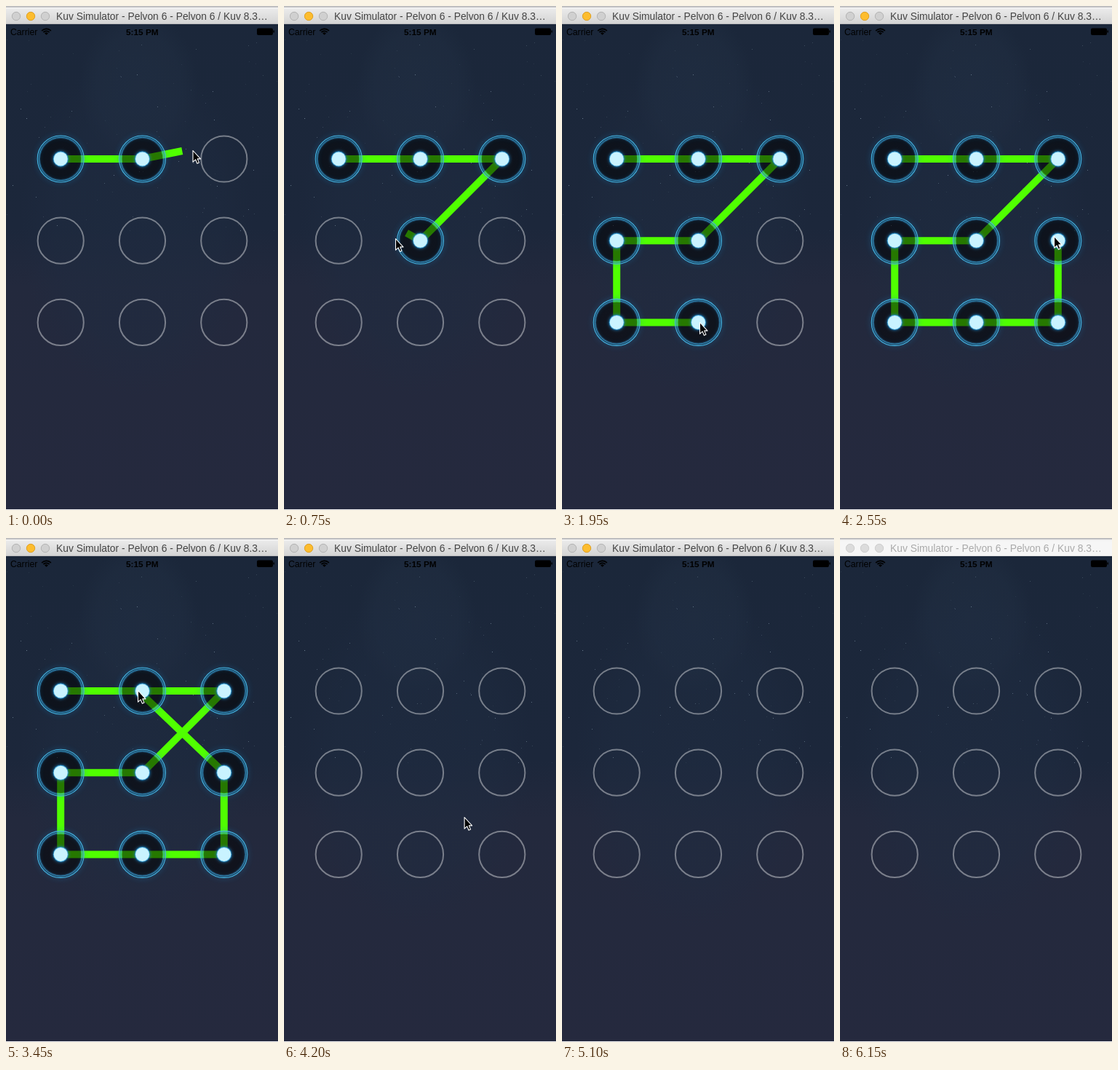
An HTML page with a canvas for the animation above (6210 ms loop, 374x692 px).

```html
<!DOCTYPE html>
<html lang="en">
<head>
<meta charset="utf-8">
<title>Pattern lock</title>
<style>
html, body { margin: 0; width: 100%; height: 100%; overflow: hidden; background: #222b3f; }
canvas { display: block; width: 374px; height: 692px; }
</style>
</head>
<body>
<canvas id="stage" width="374" height="692"></canvas>
<script>
const W = 374, H = 692, LOOP = 6210, STEP = 150, TAU = Math.PI * 2;
const RELEASE = 25, GONE = 34, INACTIVE = 41;
const TOUCH_LAG = .35, HIT_RADIUS = 31;
const SANS = '"Liberation Sans", Arial, sans-serif';
const canvas = document.getElementById('stage');
const ctx = canvas.getContext('2d');

const nodes = Array.from({ length: 9 }, (_, i) => [75.2 + (i % 3) * 112.3, 210 + Math.floor(i / 3) * 112.2]);

// Key points of the pointer: step, x, y.
const path = [
  [-1, 213, 198], [0, 256.5, 198], [1, 290, 207], [3, 236, 271], [5, 153, 319], [7, 108, 352],
  [8, 77, 330], [11, 74, 429], [12.6, 187, 434], [13, 189, 434], [14, 267, 435], [15, 297, 434],
  [16.6, 296, 317], [17, 294, 316], [21, 172, 318], [22.6, 181, 209], [RELEASE, 181, 209],
  [30, 292, 499], [31, 294, 554], [GONE, 322, 710]
];

function pointerAt(step) {
  const i = path.findIndex(key => key[0] > step);
  const [t0, x0, y0] = path[i - 1], [t1, x1, y1] = path[i];
  const k = (step - t0) / (t1 - t0);
  return [x0 + (x1 - x0) * k, y0 + (y1 - y0) * k];
}

// The line trails the pointer a little.
function touchAt(step) {
  const [x, y] = pointerAt(step - TOUCH_LAG);
  return [x + 1, y + 1];
}

// Nodes in the order the finger reaches them; the first two are already joined.
function joinedAt(step) {
  const joined = new Set([0, 1]);
  for (let s = 0; s <= step; s += .125) {
    const [x, y] = touchAt(s);
    nodes.forEach(([nx, ny], i) => {
      if (Math.hypot(x - nx, y - ny) < HIT_RADIUS) joined.add(i);
    });
  }
  return [...joined];
}

function circle(c, x, y, r) {
  c.beginPath();
  c.arc(x, y, r, 0, TAU);
}

function ring(x, y, r, width, color) {
  circle(ctx, x, y, r);
  ctx.lineWidth = width;
  ctx.strokeStyle = color;
  ctx.stroke();
}

function disc(x, y, r, color) {
  circle(ctx, x, y, r);
  ctx.fillStyle = color;
  ctx.fill();
}

function withGlow(color, blur, draw) {
  ctx.save();
  ctx.shadowColor = color;
  ctx.shadowBlur = blur;
  draw();
  ctx.restore();
}

function gradient(c, y0, y1, stops) {
  const g = c.createLinearGradient(0, y0, 0, y1);
  stops.forEach(([at, color]) => g.addColorStop(at, color));
  return g;
}

function haze(c, x, y, rx, ry, color) {
  c.save();
  c.translate(x, y);
  c.scale(rx, ry);
  const g = c.createRadialGradient(0, 0, 0, 0, 0, 1);
  g.addColorStop(0, `rgba(${color},.55)`);
  g.addColorStop(.7, `rgba(${color},.4)`);
  g.addColorStop(1, `rgba(${color},0)`);
  c.fillStyle = g;
  circle(c, 0, 0, 1);
  c.fill();
  c.restore();
}

function drawSky(c) {
  c.fillStyle = gradient(c, 25, H, [[0, '#1b273a'], [.42, '#1c273b'], [.54, '#23293d'], [1, '#25293e']]);
  c.fillRect(0, 0, W, H);
  haze(c, 182, 110, 82, 105, '34,48,68');
  haze(c, 180, 300, 160, 235, '31,44,65');

  let seed = 7;
  const random = () => (seed = seed * 16807 % 2147483647) / 2147483647;
  for (let i = 0; i < 90; i++) {
    c.fillStyle = `rgba(160,182,198,${.1 + .5 * random() ** 3})`;
    c.fillRect(Math.floor(random() * W), Math.floor(45 + random() * 265), 1, 1);
  }
  c.fillStyle = '#f4f4f6';
  c.fillRect(0, H - 1, W, 1);
}

function drawStatus(c) {
  c.fillStyle = c.strokeStyle = '#000';
  c.font = `12.2px ${SANS}`;
  c.fillText('Carrier', 6, 39.5);
  c.font = `bold 11.8px ${SANS}`;
  c.fillText('5:15 PM', 165, 39.5);

  const fan = r => c.arc(55.5, 39.7, r, -Math.PI * .77, -Math.PI * .23);
  c.lineWidth = 1.7;
  for (const r of [8.4, 5.4]) {
    c.beginPath();
    fan(r);
    c.stroke();
  }
  c.beginPath();
  c.moveTo(55.5, 39.7);
  fan(3.2);
  c.fill();

  c.beginPath();
  c.roundRect(345, 30.5, 22, 9.5, 2);
  c.fill();
  c.fillRect(367.5, 33.5, 1.5, 3);
}

function drawTitle(active) {
  ctx.fillStyle = active ? gradient(ctx, 3, 25, [[0, '#ebebeb'], [1, '#d3d3d3']]) : '#f6f6f6';
  ctx.fillRect(0, 0, W, 25);
  ctx.fillStyle = '#bfbfc1';
  ctx.fillRect(0, 0, W, 2);
  ctx.fillStyle = '#f0f0f0';
  ctx.fillRect(0, 2, W, 2);
  ctx.fillStyle = active ? '#b9b9bb' : '#dededf';
  ctx.fillRect(0, 24, W, 1);

  [14, 34, 54].forEach((x, i) => {
    const lit = active && i === 1;
    disc(x, 14, 5.7, lit ? '#fdbd2f' : active ? '#d0d0d0' : '#dcdcdc');
    ring(x, 14, 5.7, 1, lit ? '#dfa023' : active ? '#b4b4b4' : '#cecece');
  });
  ctx.fillStyle = active ? '#444' : '#aaa';
  ctx.font = `13.85px ${SANS}`;
  ctx.fillText('Kuv Simulator - Pelvon 6 - Pelvon 6 / Kuv 8.3…', 69, 19);
}

function drawIdleNode([x, y]) {
  ring(x, y, 31.6, 2, 'rgba(255,255,255,.4)');
}

function drawLitNode([x, y]) {
  disc(x, y, 28, 'rgba(0,0,0,.53)');
  ring(x, y, 30, 4, 'rgba(28,115,160,.3)');
  withGlow('#1c86c4', 7, () => ring(x, y, 32, 1.1, '#45b4e2'));
  ring(x, y, 29.7, 1, 'rgba(58,165,212,.75)');
  withGlow('#1b84c8', 4, () => disc(x, y, 10.4, '#3a9fd4'));
  disc(x, y, 9.5, '#c9f3ff');
}

function drawLine(points) {
  ctx.beginPath();
  points.forEach(p => ctx.lineTo(...p));
  ctx.strokeStyle = '#50ff00';
  ctx.lineWidth = 10;
  ctx.lineJoin = 'round';
  ctx.stroke();
}

const arrow = new Path2D('M.5 .5V16.2L4.1 12.8L6.4 18.2L9 17.1L6.7 11.9H11Z');

function drawPointer([x, y]) {
  ctx.save();
  ctx.translate(x, y);
  ctx.fillStyle = '#000';
  ctx.strokeStyle = '#fff';
  ctx.lineWidth = 1.1;
  ctx.fill(arrow);
  ctx.stroke(arrow);
  ctx.restore();
}

const backdrop = document.createElement('canvas');
backdrop.width = W;
backdrop.height = H;
drawSky(backdrop.getContext('2d'));
drawStatus(backdrop.getContext('2d'));

function render(step) {
  ctx.drawImage(backdrop, 0, 0);
  drawTitle(step < INACTIVE);

  const joined = step < RELEASE ? joinedAt(step) : [];
  if (joined.length) drawLine([...joined.map(i => nodes[i]), touchAt(step)]);
  nodes.forEach((node, i) => (joined.includes(i) ? drawLitNode : drawIdleNode)(node));
  if (step < GONE) drawPointer(pointerAt(step));
}

let shown = -1;
const start = performance.now();

function tick() {
  const step = Math.floor((performance.now() - start) % LOOP / STEP);
  if (step !== shown) render(shown = step);
  requestAnimationFrame(tick);
}
tick();
</script>
</body>
</html>
```
